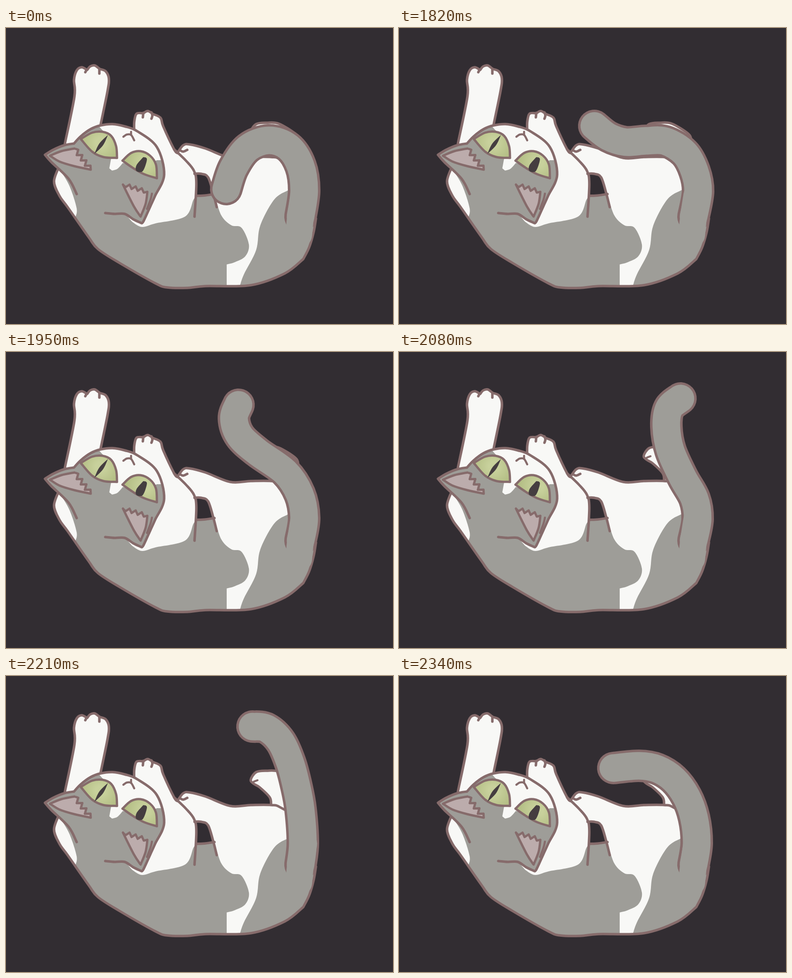
Write an HTML page with a canvas that moves like this. It is 854 by 656 pixels and loops after 2.47 s.

```html
<!DOCTYPE html>
<html lang="en">
<head>
<meta charset="utf-8">
<title>Cat swishing its tail</title>
<style>
html, body { margin: 0; height: 100%; overflow: hidden; background: #322d32; }
canvas { display: block; }
</style>
</head>
<body>
<canvas id="stage" width="854" height="656"></canvas>
<script>
const ctx = document.getElementById('stage').getContext('2d');
const DARK = '#322d32', WHITE = '#f8f8f6', GREY = '#9e9d98', LINE = '#866b6b', PINK = '#bcacac', PUPIL = '#453e40';

// Smooth curve through "x,y" points; "/" marks a sharp corner.
function curve(text) {
  const path = new Path2D();
  let last;
  for (const run of text.split('/')) {
    const pts = run.trim().split(/\s+/).map(s => s.split(',').map(Number));
    if (last) pts.unshift(last);
    else path.moveTo(...pts[0]);
    const at = i => pts[Math.max(0, Math.min(pts.length - 1, i))];
    for (let i = 0; i < pts.length - 1; i++) {
      const [a, b, c, d] = [at(i - 1), at(i), at(i + 1), at(i + 2)];
      path.bezierCurveTo(b[0] + (c[0] - a[0]) / 6, b[1] + (c[1] - a[1]) / 6,
        c[0] - (d[0] - b[0]) / 6, c[1] - (d[1] - b[1]) / 6, ...c);
    }
    last = pts[pts.length - 1];
  }
  return path;
}

// Zigzag of fur between two points.
function tuft(x0, y0, x1, y1, teeth, depth) {
  const dx = x1 - x0, dy = y1 - y0, len = Math.hypot(dx, dy);
  const pts = [`${x0},${y0}`];
  for (let i = 1; i < teeth * 2; i++) {
    const k = i / (teeth * 2), h = (i % 2 ? depth : -depth) / len;
    pts.push(`${x0 + dx * k - dy * h},${y0 + dy * k + dx * h}`);
  }
  return [...pts, `${x1},${y1}`].join(' / ');
}

function fill(path, color) { ctx.fillStyle = color; ctx.fill(path); }
function stroke(path, width = 5.5, color = LINE) {
  ctx.lineWidth = width;
  ctx.strokeStyle = color;
  ctx.stroke(path);
}
function shape(path, color, width) { fill(path, color); stroke(path, width); }

function glow(x, y) {
  const g = ctx.createRadialGradient(x, y, 10, x, y, 46);
  g.addColorStop(0, '#c8d19c');
  g.addColorStop(1, '#b2bc83');
  return g;
}

const farLeg = curve('585,286 582,269 560,247 547,239 540,230 552,213 575,210 602,212 639,235 645,250 / 640,300');
const body = curve(`118,305 106,340 118,372 136,397 182,463 203,490 251,521 330,566 356,575 400,576 440,572 540,570
  615,544 656,512 / 669,486 679,452 684,422 / 650,400 / 640,320 605,291 585,286 540,286 495,288 440,267 405,258
  391,260 378,277 / 371,269 347,218 341,199 325,191 / 313,184 303,189 / 288,190 283,208 283,230`);
const coat = curve(`120,316 140,350 156,400 152,422 / 120,430 / 250,620 / 487,620 / 487,524 / 505,519 528,506 536,480
  520,443 497,437 475,415 460,369 / 423,372 / 414,380 395,418 330,433 300,441 279,430 / 200,340`);
const rump = curve('516,572 525,546 552,492 561,438 592,380 624,359 / 700,360 / 700,620');
const thigh = curve('416,323 430,323 446,331 458,369 465,397');
const gap = curve('418,323 430,323 446,331 458,369 / 422,372');
const belly = curve('421,372 440,371 460,368');
const chest = curve('371,269 398,295 415,317 420,345 416,418');
const arm = curve(`130,256 151,152 150,115 156,94 167,87 179,93 / 186,85 196,83 207,91 / 220,96 227,112 224,140
  208,218 / 200,270 / 150,285`);
const toes = ['178,92 175,98', '206,90 206,101', '303,188 302,198', '321,187 323,194 321,201',
  '384,271 391,274 400,270'].map(curve);
const farToe = curve('547,234 555,231');

const head = curve(`156,368 138,334 100,297 86,281 / 104,270 128,260 150,256 / 165,240 187,224 208,216 235,213 262,218
  290,229 333,264 349,325 329,372 319,394 303,429 298,432 / 281,424 262,412 240,412 219,410`);
const muzzle = curve(`206,219 / 235,214 262,219 290,230 333,265 345,293 / 333,293 / 290,310 / 258,299 / 246,312
  234,316 / 228,311 / 232,289 / 225,240`);
const eyes = [curve('165,246 190,232 213,230 232,239 243,262 245,288 / 215,286 190,274 165,246'),
  curve('257,294 276,277 297,273 318,283 331,303 333,333 / 305,324 280,310 257,294')];
const pupils = [curve('225,237 214,260 195,279 / 206,256 225,237'),
  curve('303,286 311,291 302,317 288,317 288,304 303,286')];
const ears = [curve(tuft(151, 267, 187, 314, 4, -5) + ' / 150,306 118,296 97,283 / 122,273 151,267'),
  curve(tuft(258, 347, 312, 363, 4, 4) + ' / 308,390 297,418 / 282,395 258,347')];
const earFold = curve('322,367 319,380 311,401');
const mouth = ['259,241 267,236 276,237 283,249', '276,230 276,237'].map(curve);

// Tail midlines from tip to hip; the last part blends into the rump.
const HIP = ' 650,418';
const blend = curve('657,372 650,418 646,458');
const tails = [
  '486,357 502,310 534,266 580,249 623,264 650,306 658,360',
  '431,217 462,241 500,253 545,250 588,251 630,277 652,317 660,362',
  '513,117 503,147 516,186 555,222 616,266 648,315 658,368',
  '621,103 596,125 590,165 599,218 626,278 652,325 659,370',
  '544,112 575,116 606,145 627,192 641,245 650,295 655,370',
  '473,204 530,199 570,206 606,229 634,267 651,314 657,370'
].map(mid => curve(mid + HIP));

function draw(tail) {
  ctx.fillStyle = DARK;
  ctx.fillRect(0, 0, 854, 656);
  shape(farLeg, WHITE);
  stroke(farToe, 4.5);

  shape(arm, WHITE);
  fill(body, WHITE);
  ctx.save();
  ctx.clip(body);
  fill(coat, GREY);
  fill(rump, GREY);
  ctx.restore();
  stroke(body);
  fill(gap, DARK);
  [thigh, belly, chest, ...toes].forEach(p => stroke(p));

  fill(head, GREY);
  fill(muzzle, WHITE);
  stroke(head);
  shape(eyes[0], glow(208, 254), 5);
  shape(eyes[1], glow(308, 298), 5);
  pupils.forEach(p => fill(p, PUPIL));
  ears.forEach(p => shape(p, PINK, 5));
  [earFold, ...mouth].forEach(p => stroke(p, 4.5));

  stroke(tail, 72);
  stroke(tail, 61, GREY);
  stroke(blend, 59, GREY);
}

const REST = 1820, STEP = 130, LOOP = 2470;
let shown = -1;
ctx.lineCap = ctx.lineJoin = 'round';

function tick() {
  const t = performance.now() % LOOP;
  const pose = t < REST ? 0 : 1 + Math.floor((t - REST) / STEP);
  if (pose !== shown) draw(tails[shown = pose]);
  requestAnimationFrame(tick);
}
tick();
</script>
</body>
</html>
```
